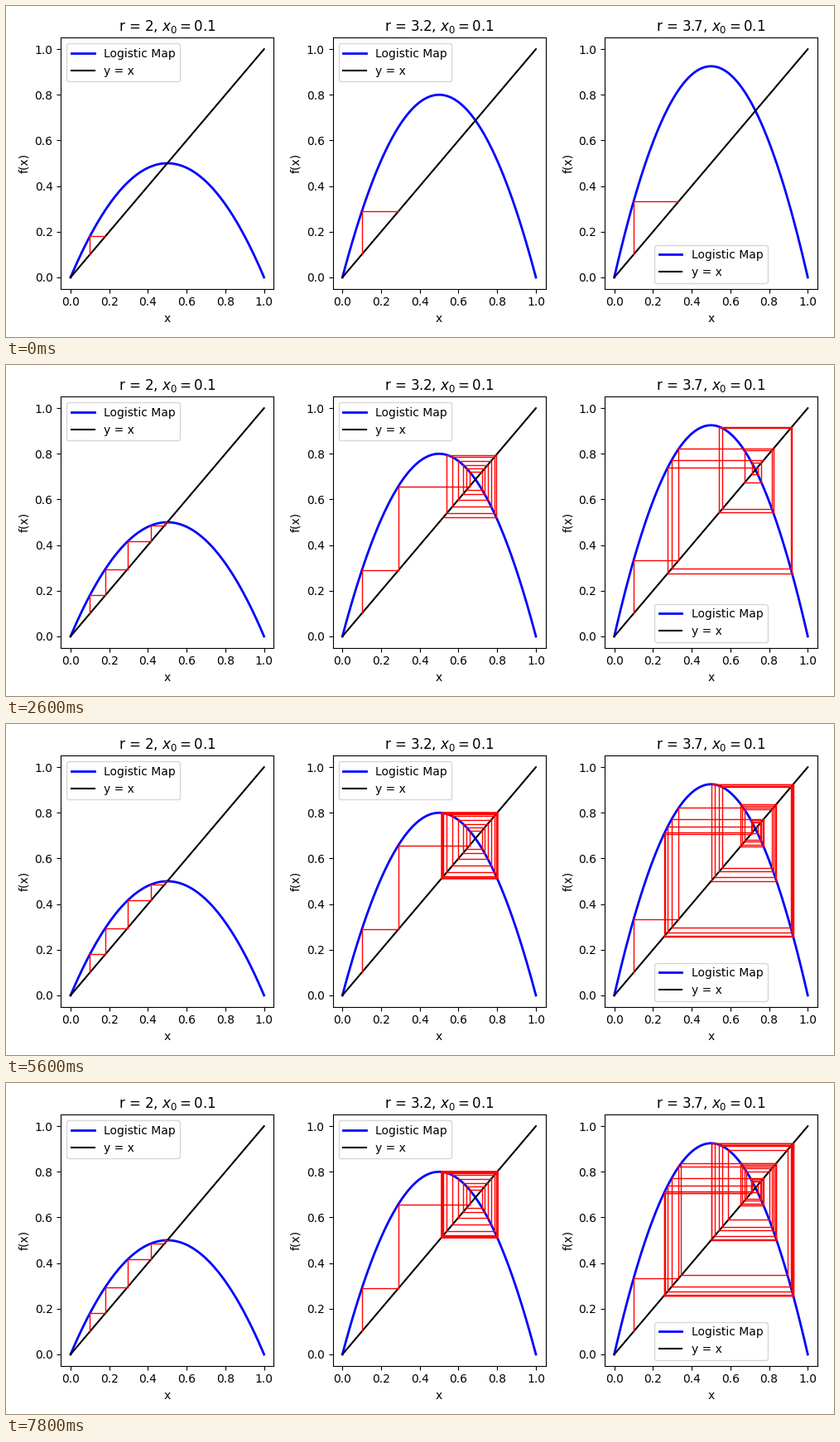
A matplotlib script that plays this animation: 1000 by 400 pixels, repeating every 8000 ms.

```python
import numpy as np
import matplotlib.pyplot as plt
from matplotlib.animation import FuncAnimation

FRAMES = 40
INTERVAL = 200
X0 = 0.1
PANELS = [(2, "upper left"), (3.2, "upper left"), (3.7, "lower center")]


def logistic(r, x):
    return r * x * (1 - x)


def draw_panel(ax, r, legend_loc):
    x = np.linspace(0, 1, 100)
    ax.plot(x, logistic(r, x), "b", lw=2, label="Logistic Map")
    ax.plot(x, x, "k", lw=1.5, label="y = x")
    ax.set_xlabel("x")
    ax.set_ylabel("f(x)")
    ax.set_title(f"r = {r}, $x_0 = {X0}$")
    ax.legend(loc=legend_loc)


def cobweb(ax, r):
    """Return one (vertical, horizontal) pair of hidden lines per iteration."""
    steps = []
    x = X0
    for _ in range(FRAMES):
        y = logistic(r, x)
        style = dict(color="r", lw=1, visible=False)
        up, = ax.plot([x, x], [x, y], **style)
        across, = ax.plot([x, y], [y, y], **style)
        steps.append((up, across))
        x = y
    return steps


fig, axes = plt.subplots(1, 3, figsize=(10, 4), dpi=100)
for ax, (r, loc) in zip(axes, PANELS):
    draw_panel(ax, r, loc)
fig.tight_layout()

webs = [cobweb(ax, r) for ax, (r, _) in zip(axes, PANELS)]


def update(frame):
    for steps in webs:
        for i, pair in enumerate(steps):
            for line in pair:
                line.set_visible(i <= frame)
    return []


ani = FuncAnimation(fig, update, frames=FRAMES, interval=INTERVAL,
                    repeat=True, repeat_delay=0, blit=False)
plt.show()
```
